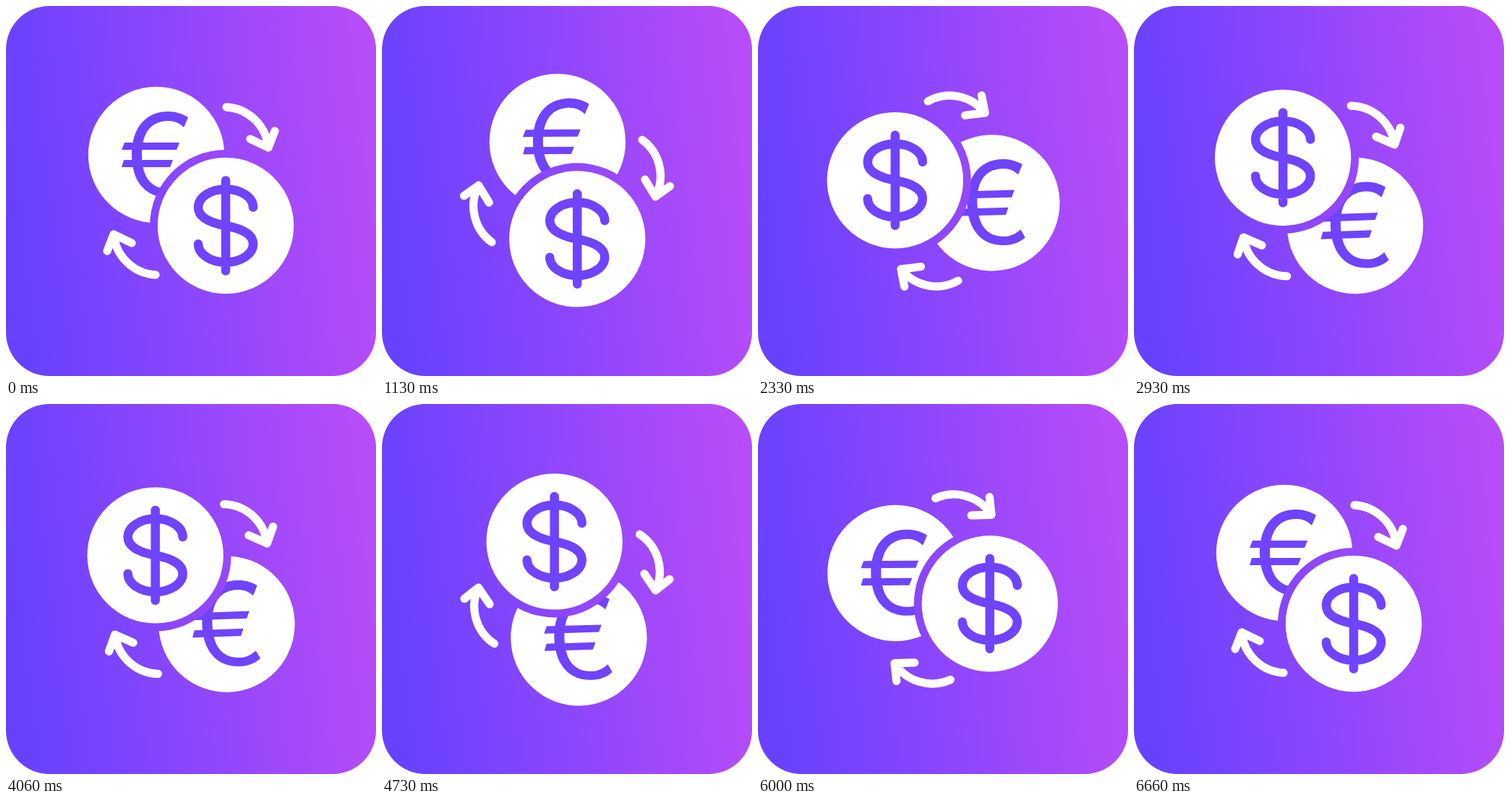
An HTML page that plays this animation: 512x512 px, repeating every 8800 ms.

```html
<!DOCTYPE html>
<html lang="en">
<head>
<meta charset="utf-8">
<title>Currency exchange</title>
<style>
  html, body { margin: 0; width: 100%; height: 100%; overflow: hidden; background: #fff; }
  svg { display: block; width: 100%; height: 100%; }
  .coin { fill: #fff; }
  .sign { fill: #7043ff; }
  .line { fill: none; stroke: #7043ff; stroke-width: 12.5; stroke-linecap: round; }
  .arrow { fill: none; stroke: #fff; stroke-width: 11.3; stroke-linecap: round; stroke-linejoin: round; }
</style>
</head>
<body>
<svg viewBox="0 0 512 512">
  <defs>
    <linearGradient id="bg" gradientUnits="userSpaceOnUse" x1="10" y1="286" x2="502" y2="226">
      <stop offset="0" stop-color="#6841ff"/>
      <stop offset="1" stop-color="#b74cf9"/>
    </linearGradient>
    <path id="arrow" class="arrow" d="M49-116A62 62 0 0 1 107-60M82-72L107-60L116-83"/>
  </defs>
  <rect width="512" height="512" rx="60" fill="url(#bg)"/>

  <g id="arrows">
    <use href="#arrow"/>
    <use href="#arrow" transform="rotate(180)"/>
  </g>

  <g id="euro">
    <circle class="coin" r="94.2"/>
    <path class="sign" d="M44-52C36-57 27-60 16-60C-14-60-34-38-34 0C-34 38-14 59 16 59C27 59 37 56 45 49L39 38C32 44 25 47 17 47C-8 47-20 30-20 0C-20-30-8-47 17-47C25-47 32-44 38-38Z"/>
    <path class="sign" d="M-44-17H32L28-7H-48ZM-45 7H23L19 17H-48Z"/>
  </g>

  <circle id="gap" r="105" fill="url(#bg)"/>
  <g id="dollar">
    <circle class="coin" r="94.2"/>
    <path class="line" d="M0-62.5V62.5M38-25.3A38 25.3 0 0 0-38-25.3C-38-12-22-4 0 0C22 4 38 12 38 25.3A38 25.3 0 0 1-38 25.3"/>
  </g>
</svg>
<script>
  const LOOP = 8800, STEP = 200 / 3, TURN = 2600, MID = 256;
  const HALF = 178.3, TILT = -2;
  const el = id => document.getElementById(id);
  const [arrows, euro, gap, dollar] = ['arrows', 'euro', 'gap', 'dollar'].map(el);

  // smooth ease over one half turn
  function ease(t, start) {
    const x = Math.min(1, Math.max(0, (t - start) / TURN));
    return x * x * (3 - 2 * x);
  }

  function orbit(x, y, deg) {
    const a = deg * Math.PI / 180, c = Math.cos(a), s = Math.sin(a);
    return [MID + x * c - y * s, MID + x * s + y * c];
  }

  function draw(now) {
    // the motion runs at 15 steps per second
    const t = Math.floor((now % LOOP + 6.7) / STEP) * STEP;
    const out = ease(t, 420), back = ease(t, 4040);
    const deg = HALF * out + (360 - HALF) * back;
    const [ex, ey] = orbit(-48, -50, deg);
    const [dx, dy] = orbit(48, 48, deg);

    arrows.setAttribute('transform', `translate(${MID} ${MID}) rotate(${deg})`);
    euro.setAttribute('transform', `translate(${ex} ${ey}) rotate(${TILT * (out - back)})`);
    dollar.setAttribute('transform', `translate(${dx} ${dy})`);
    gap.setAttribute('cx', dx);
    gap.setAttribute('cy', dy);
  }

  function tick() {
    draw(performance.now());
    requestAnimationFrame(tick);
  }
  tick();
</script>
</body>
</html>
```
